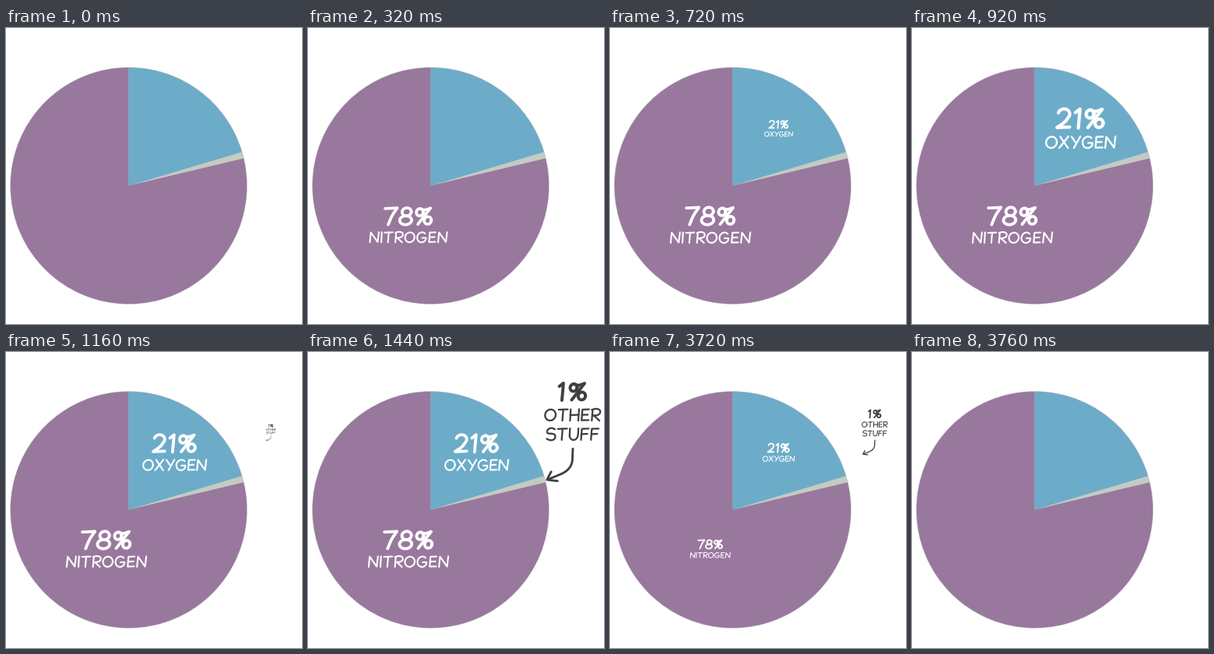
Animation of 380 by 380 pixels, one loop 4 s. Source, as a matplotlib script:

```python
import numpy as np
import matplotlib.pyplot as plt
from matplotlib.animation import FuncAnimation
from matplotlib.patches import Circle, Wedge

SIZE, DPI = 380, 100
FRAMES, STEP_MS = 100, 40
PX = 72 / DPI
PURPLE, BLUE, GREY, INK = "#99789d", "#6cacc9", "#c3cbc3", "#3f4042"
CENTER, RADIUS = (157.5, 202.5), 151.6
SLANT = 0.06


def line(*xy):
    return np.array(xy, float).reshape(-1, 2)


def arc(cx, cy, rx, ry, start=0, end=360):
    a = np.radians(np.linspace(start, end, 40))
    return np.column_stack([cx + rx * np.cos(a), cy + ry * np.sin(a)])


def curve(*xy):
    """Corner-cut a polyline into a smooth stroke."""
    p = line(*xy)
    for _ in range(4):
        a, b = p[:-1], p[1:]
        cut = np.stack([0.75 * a + 0.25 * b, 0.25 * a + 0.75 * b], 1)
        p = np.vstack([p[:1], cut.reshape(-1, 2), p[-1:]])
    return p


def join(*parts):
    return np.vstack(parts)


# Each glyph: advance width, then strokes in a box of height 1 (y down).
GLYPHS = {
    "N": (.86, line(.02, 1, .06, .03, .78, .97, .84, 0)),
    "I": (.04, line(.02, 0, .02, 1)),
    "T": (.79, line(0, .05, .79, .02), line(.4, .04, .38, 1)),
    "R": (.72, line(.08, .04, .06, 1),
          curve(0, .06, .4, -.06, .78, .1, .7, .5, .1, .58),
          line(.22, .56, .72, 1)),
    "O": (.93, arc(.46, .51, .46, .48)),
    "G": (.9, join(arc(.45, .51, .45, .49, 312, 30), line(.86, .56, .48, .56))),
    "E": (.64, line(.62, .02, .05, .04, .03, .97, .64, .95),
          line(.04, .5, .54, .48)),
    "X": (.79, line(.05, .02, .77, 1), line(.74, 0, .02, 1)),
    "Y": (.79, line(.02, .02, .4, .52), line(.78, 0, .28, 1)),
    "H": (.79, line(.04, .02, .04, 1), line(.76, 0, .75, 1),
          line(.04, .52, .75, .49)),
    "S": (.72, curve(.68, .08, .4, -.06, .02, .08, .02, .46, .4, .44,
                     .76, .54, .74, .94, .36, 1.06, .02, .9)),
    "U": (.79, join(line(.03, 0, .03, .5), arc(.39, .6, .36, .4, 180, 0),
                    line(.76, .5, .76, 0))),
    "F": (.64, line(.64, .02, .05, .04, .03, 1), line(.04, .5, .55, .47)),
    "1": (.32, line(.03, .2, .26, .01, .23, 1)),
    "2": (.68, join(arc(.34, .28, .3, .27, 195, 385),
                    curve(.58, .44, .42, .7, .02, .97),
                    line(.02, .97, .68, .95))),
    "7": (.73, line(.02, .05, .73, .02), curve(.73, .02, .45, .45, .26, 1)),
    "8": (.73, arc(.39, .25, .27, .24), arc(.36, .74, .35, .26)),
    "%": (1.0, arc(.25, .27, .2, .21), arc(.75, .75, .21, .22),
          curve(.27, .06, .5, .16, .86, .03), line(.86, .03, .18, .98)),
}


def write(text, left, right, top, height, width):
    """Lay out text between two edges, sharing the spare room as gaps."""
    used = sum(GLYPHS[c][0] for c in text) * height
    gap = (right - left - used) / (len(text) - 1)
    strokes, x = [], left
    for c in text:
        advance, *parts = GLYPHS[c]
        for p in parts:
            lean = SLANT * (0.5 - p[:, 1])
            q = np.column_stack([p[:, 0] + lean, p[:, 1]]) * height
            strokes.append((q + (x, top), width))
        x += advance * height + gap
    return strokes


class Label:
    def __init__(self, ax, center, color, start, peak, strokes):
        self.center = np.array(center)
        self.start, self.peak, self.strokes = start, peak, strokes
        self.lines = [ax.plot([], [], color=color, solid_capstyle="round",
                              solid_joinstyle="round")[0] for _ in strokes]

    def scale(self, n):
        if n >= 93:
            return 0.5 if n == 93 else 0
        at, size = self.peak
        return np.interp(n - self.start, [.6, 8, at, 14], [0, .97, size, 1])

    def update(self, n):
        s = self.scale(n)
        for artist, (pts, width) in zip(self.lines, self.strokes):
            artist.set_visible(s > 0)
            artist.set_data(*(self.center + (pts - self.center) * s).T)
            artist.set_linewidth(width * s * PX)


fig = plt.figure(figsize=(SIZE / DPI, SIZE / DPI), dpi=DPI, facecolor="white")
ax = fig.add_axes([0, 0, 1, 1])
ax.set(xlim=(0, SIZE), ylim=(SIZE, 0))
ax.axis("off")

# The y axis points down, so angles run clockwise from the right.
ax.add_patch(Circle(CENTER, RADIUS + 0.6, fc="#bdb9c6", lw=0))
ax.add_patch(Wedge(CENTER, RADIUS, -18, -12, fc=GREY, lw=0))
ax.add_patch(Wedge(CENTER, RADIUS, -13.4, 270, fc=PURPLE, lw=0))
ax.add_patch(Wedge(CENTER, RADIUS, 270, 343.4, fc=BLUE, lw=0))

arrow = [(curve(340, 122.5, 339, 147, 311, 158.5), 2.6),
         (line(314.5, 149.5, 309.5, 159, 322, 160.5), 2.6)]
labels = [
    Label(ax, (128.5, 252.5), "white", 0, (11, 1.42),
          write("78%", 97, 160.5, 230, 22.5, 3.8)
          + write("NITROGEN", 78, 180, 262.3, 13.6, 2.1)),
    Label(ax, (216.5, 129), "white", 14, (10, 1.23),
          write("21%", 189, 244, 106, 22.5, 3.8)
          + write("OXYGEN", 176.2, 257, 138.2, 13.6, 2.1)),
    Label(ax, (340, 103.5), INK, 27, (9, 1.09),
          write("1%", 323, 356, 45, 20.5, 3.6)
          + write("OTHER", 307.3, 371.7, 75.8, 13.6, 2.1)
          + write("STUFF", 309.3, 370, 98.5, 13.6, 2.1)
          + arrow),
]


def draw(n):
    for label in labels:
        label.update(n)
    return [a for label in labels for a in label.lines]


anim = FuncAnimation(fig, draw, frames=FRAMES, interval=STEP_MS,
                     init_func=lambda: draw(0), repeat=True, repeat_delay=0)
plt.show()
```
